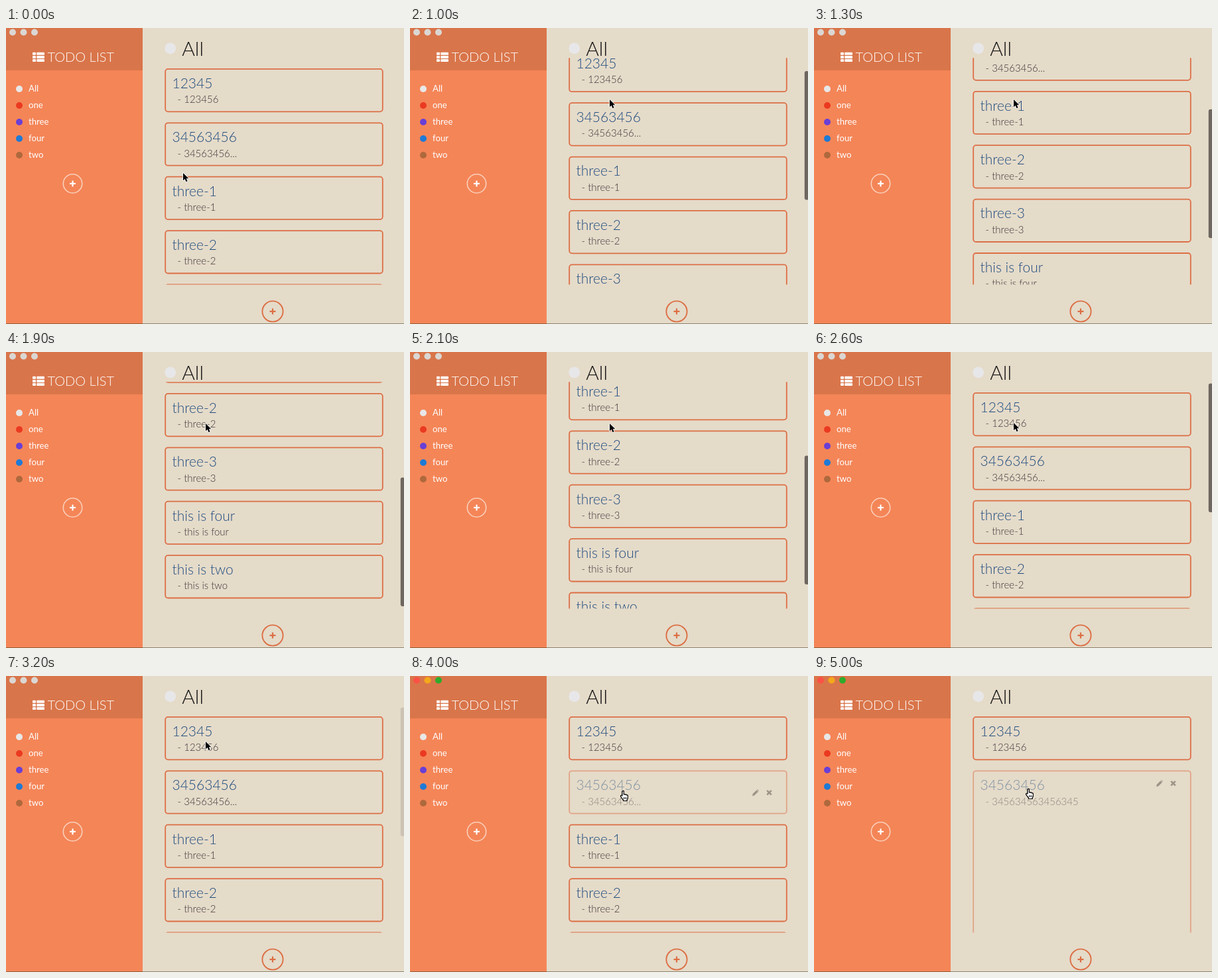
Animation, 600 px wide and 447 px high, one loop 5.1 s. Source, as an HTML page with a canvas:

```html
<!DOCTYPE html>
<html lang="en">
<head>
<meta charset="utf-8">
<title>Todo list</title>
<style>
html, body { margin: 0; width: 100%; height: 100%; overflow: hidden; background: #e5dbc9; }
canvas { display: block; width: 600px; height: 447px; }
</style>
</head>
<body>
<canvas id="stage" width="600" height="447"></canvas>
<script>
const ctx = document.getElementById('stage').getContext('2d');
const LOOP = 5100, STEP = 100;
const ACCENT = '#dc6f45', PAPER = '#e5dbc9';
const VIEW = { top: 45.3, bottom: 387.4 };
const CARD = { x: 240.2, top: 61.9, width: 327.6, height: 64.4, pitch: 81.4 };
const MAX_SCROLL = 243.2;
const OPENED = 1;

const cards = [
  ['12345', '123456'],
  ['34563456', '34563456...'],
  ['three-1', 'three-1'],
  ['three-2', 'three-2'],
  ['three-3', 'three-3'],
  ['this is four', 'this is four'],
  ['this is two', 'this is two']
];
const lists = [
  ['All', '#e8e8e8'], ['one', '#ea3a20'], ['three', '#693fd6'],
  ['four', '#1e7ad6'], ['two', '#ae693d']
];
// time, x, y of the pointer tip
const pointerPath = [
  [0, 267, 219], [600, 301, 108], [2500, 301, 108], [3000, 301, 99],
  [3300, 301, 99], [3800, 320, 172], [4000, 321, 173],
  [4300, 321, 173], [4900, 323, 170], [LOOP, 323, 170]
];

const arrow = new Path2D('M0 0V11.3L2.7 8.9L4.5 13.2L6.6 12.3L4.8 8.2H8.3Z');
const hand = new Path2D('M3 8V1.5Q3 .4 4.2 .4Q5.4 .4 5.4 1.5V6Q7 5.2 7.6 6.3Q9 5.6 9.6 6.9' +
  'Q11.3 6.4 11.4 8.2V11Q11.2 12.6 10 14V15.5H4.5V14Q2.5 12 .6 8.8Q.3 7.2 1.8 7.4Z');
const knuckles = new Path2D('M5.4 10V13M7.2 10V13M9 10V13');
const pencil = new Path2D('M0 10L.7 7.1L6.5 1.3L8.9 3.7L3 9.4ZM7.1 .7L7.8 0L10.2 2.4L9.5 3.1Z');

const clamp = v => Math.min(1, Math.max(0, v));
const progress = (t, from, to) => clamp((t - from) / (to - from));
const smooth = u => u * u * (3 - 2 * u);
const ease = (t, from, to) => smooth(progress(t, from, to));

function pointerAt(t) {
  const i = pointerPath.findIndex(p => p[0] > t);
  const [t0, x0, y0] = pointerPath[i - 1], [t1, x1, y1] = pointerPath[i];
  const u = ease(t, t0, t1);
  return [x0 + (x1 - x0) * u, y0 + (y1 - y0) * u];
}

function rect(x, y, w, h, color) {
  ctx.fillStyle = color;
  ctx.fillRect(x, y, w, h);
}

function rounded(x, y, w, h, r) {
  ctx.beginPath();
  ctx.roundRect(x, y, w, h, r);
}

function dot(x, y, r, color) {
  ctx.fillStyle = color;
  ctx.beginPath();
  ctx.arc(x, y, r, 0, Math.PI * 2);
  ctx.fill();
}

function text(str, x, y, size, color, weight = 300) {
  ctx.font = `${weight} ${size}px Lato, "Lato Light", sans-serif`;
  ctx.fillStyle = color;
  ctx.fillText(str, x, y);
}

function addButton(x, y, r, ring, width, color) {
  ctx.strokeStyle = ring;
  ctx.lineWidth = width;
  ctx.beginPath();
  ctx.arc(x, y, r, 0, Math.PI * 2);
  ctx.stroke();
  rect(x - 4.5, y - 1.1, 9, 2.2, color);
  rect(x - 1.1, y - 4.5, 2.2, 9, color);
}

function drawSidebar(focused) {
  rect(0, 0, 206, 447, '#f48557');
  rect(0, 0, 206, 64, '#d9754a');
  const lights = focused ? ['#fb5245', '#f3a81c', '#2eab2c'] : Array(3).fill('#dbd7d3');
  lights.forEach((color, i) => dot(10 + i * 16.5, 6.5, 5, color));

  ctx.fillStyle = '#fff';
  for (let row = 0; row < 3; row++) {
    const y = 36.8 + row * 5.1;
    rounded(40, y, 5, 4, 0.9);
    ctx.fill();
    rounded(46.2, y, 11.8, 4, 0.9);
    ctx.fill();
  }
  text('TODO LIST', 62.5, 50.5, 20, '#fff');
  lists.forEach(([name, color], i) => {
    const y = 92 + i * 25;
    dot(20, y, 5, color);
    text(name, 34, y + 4.4, 13.2, '#fff', 400);
  });
  addButton(100.5, 235, 14.2, '#fad0bb', 1.6, '#fff');
}

function drawActions(y) {
  ctx.fillStyle = ctx.strokeStyle = '#564e48';
  ctx.save();
  ctx.translate(516, y - 5);
  ctx.fill(pencil);
  ctx.restore();
  ctx.lineWidth = 2.6;
  ctx.beginPath();
  ctx.moveTo(538.2, y - 3.2);
  ctx.lineTo(544.8, y + 3.4);
  ctx.moveTo(544.8, y - 3.2);
  ctx.lineTo(538.2, y + 3.4);
  ctx.stroke();
}

function drawCards(t, scroll) {
  const hover = progress(t, 3700, 3900);
  const open = t >= 4300;
  const growth = 330 * ease(t, 4250, 4650);
  ctx.save();
  ctx.beginPath();
  ctx.rect(206, VIEW.top, 394, VIEW.bottom - VIEW.top);
  ctx.clip();
  cards.forEach(([title, note], i) => {
    const active = i === OPENED;
    const y = CARD.top + i * CARD.pitch - scroll + (i > OPENED ? growth : 0);
    ctx.globalAlpha = active ? 1 - 0.5 * hover : 1;
    ctx.strokeStyle = ACCENT;
    ctx.lineWidth = 1.8;
    rounded(CARD.x, y, CARD.width, CARD.height + (active ? growth : 0), 4);
    ctx.stroke();
    text(title, 250.5, y + 28.8, 21, '#204d80');
    text('- ' + (active && open ? '345634563456345' : note), 258.6, y + 51.3, 15, '#3c3438');
    if (active && hover > 0) {
      ctx.globalAlpha *= hover;
      drawActions(open ? 162 : 176);
    }
  });
  ctx.restore();
}

function drawScrollbar(t, scroll) {
  const alpha = t < 800 ? 0 : 1 - progress(t, 3000, 3250);
  if (!alpha) return;
  ctx.save();
  ctx.globalAlpha = alpha;
  ctx.fillStyle = '#6e6760';
  rounded(594.8, 47.5 + scroll * 0.584, 6.5, 194.5, 3);
  ctx.fill();
  ctx.restore();
}

function drawPointer(t) {
  const [x, y] = pointerAt(t);
  const pointing = t >= 3800;
  const shape = pointing ? hand : arrow;
  ctx.save();
  ctx.translate(pointing ? x - 4 : x, y);
  ctx.lineJoin = 'round';
  ctx.lineWidth = pointing ? 1.1 : 1.6;
  ctx.strokeStyle = pointing ? '#000' : '#fff';
  ctx.fillStyle = pointing ? '#fff' : '#000';
  ctx.stroke(shape);
  ctx.fill(shape);
  if (pointing) {
    ctx.stroke(shape);
    ctx.lineWidth = 0.8;
    ctx.stroke(knuckles);
  }
  ctx.restore();
}

function draw(t) {
  const scroll = MAX_SCROLL * (ease(t, 780, 1780) - ease(t, 1900, 2540));
  rect(0, 0, 600, 447, PAPER);
  drawSidebar(t >= 3800);
  dot(247.7, 30.8, 8.4, '#e7e7e9');
  text('All', 265.3, 42, 30, '#111');
  drawCards(t, scroll);
  drawScrollbar(t, scroll);
  addButton(402, 428, 15.6, ACCENT, 1.9, ACCENT);
  rect(0, 446, 600, 1, 'rgba(70, 60, 35, 0.55)');
  drawPointer(t);
}

const start = performance.now();
function tick() {
  const t = (performance.now() - start) % LOOP;
  draw(Math.floor(t / STEP) * STEP);
  requestAnimationFrame(tick);
}
tick();
</script>
</body>
</html>
```
